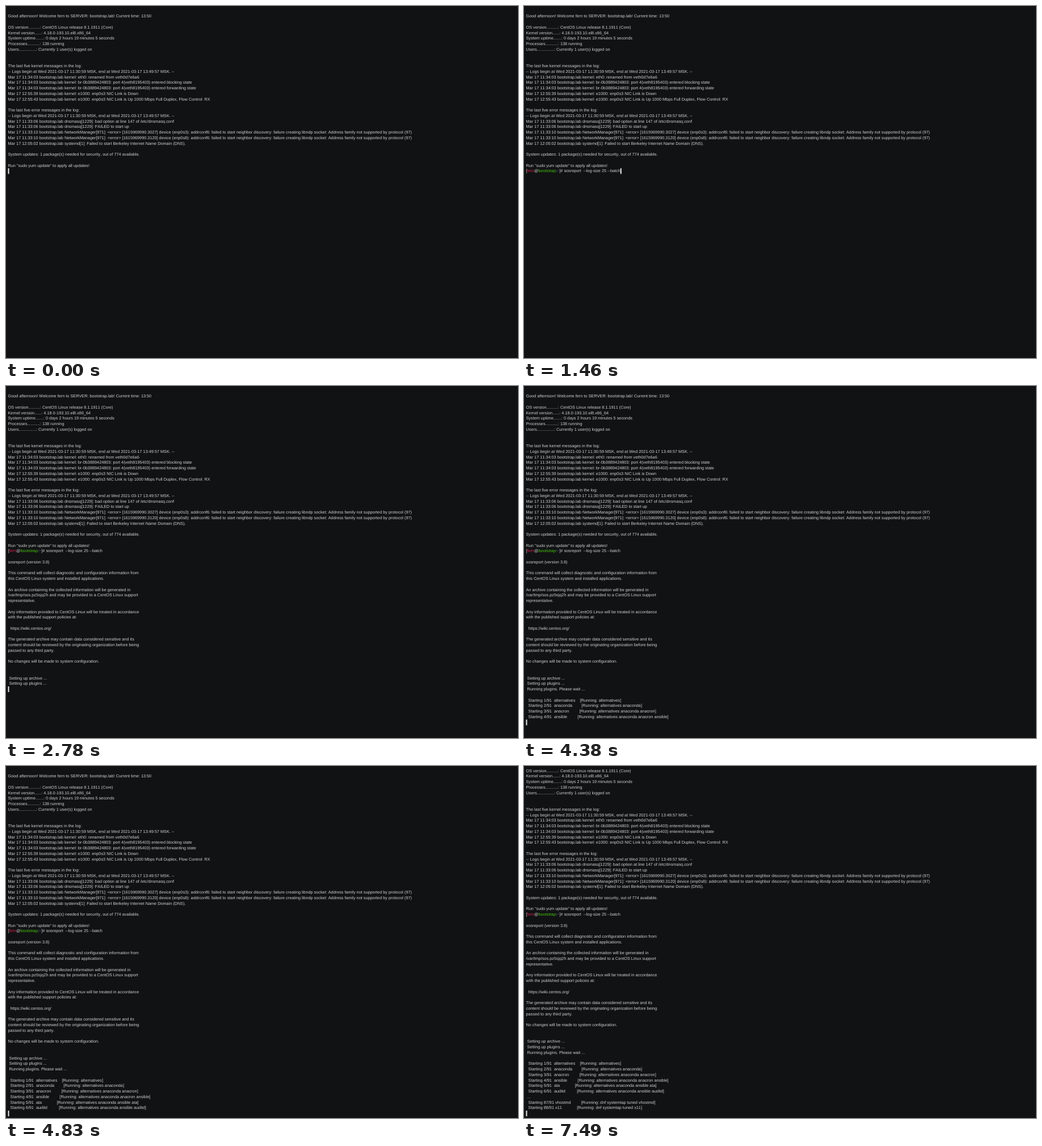
These frames come from a looping animation (902 by 621 pixels, 8 s). An HTML page:

```html
<!DOCTYPE html>
<html lang="en">
<head>
<meta charset="utf-8">
<title>Terminal session</title>
<style>
  html, body { margin: 0; width: 100%; height: 100%; overflow: hidden; background: #111214; }
  #screen {
    position: absolute; left: 0; top: 0; width: 902px; height: 621px; overflow: hidden;
    color: #d0d0d0; font: 7.3px/9.75px "Liberation Sans", Arial, sans-serif;
    text-rendering: geometricPrecision; font-kerning: none;
  }
  .row, #cursor { position: absolute; left: 0; top: 0; transform-origin: 0 0; }
  .row { height: 9.75px; white-space: pre; }
  #cursor { width: 2px; height: 9.5px; background: #e8e8e8; }
  .user { color: #d4204c; }
  .host { color: #45c90c; }
  .path { color: #5a78c8; }
</style>
</head>
<body>
<div id="screen"><div id="cursor"></div></div>
<script>
const LOOP = 8000, PITCH = 9.75, TOP = 3.6, LEFT = 3.5, LAST_ROW = 62, PROMPT_ROW = 29;
const USER = "fern";

const logSpan = "-- Logs begin at Wed 2021-03-17 11:30:59 MSK, end at Wed 2021-03-17 13:49:57 MSK. --";
const log = (time, text) => `Mar 17 ${time} bootstrap.lab ${text}`;
const port = state => log("11:34:03", `kernel: br-0b3889424803: port 4(veth8195403) entered ${state} state`);
const ndp = (id, dev) => log("11:33:10", `NetworkManager[971]: <error> [1615969990.${id}] device (${dev}): addrconf6: ` +
  "failed to start neighbor discovery: failure creating libndp socket: Address family not supported by protocol (97)");
const info = (name, dots, value) => `${name}${".".repeat(dots)}: ${value}`;
const start = (n, name, running) =>
  `  Starting ${(n + "/91").padEnd(5)} ${name.padEnd(15)} [Running: ${running}]`;

const lines = [
  "",
  `Good afternoon! Welcome ${USER} to SERVER: bootstrap.lab! Current time: 13:50`,
  "",
  info("OS version", 10, "CentOS Linux release 8.1.1911 (Core)"),
  info("Kernel version", 6, "4.18.0-193.10.el8.x86_64"),
  info("System uptime", 7, "0 days 2 hours 19 minutes 5 seconds"),
  info("Processes", 11, "138 running"),
  info("Users", 15, "Currently 1 user(s) logged on"),
  "", "",
  "The last five kernel messages in the log:",
  logSpan,
  log("11:34:03", "kernel: eth0: renamed from veth0d7e6a6"),
  port("blocking"),
  port("forwarding"),
  log("12:55:39", "kernel: e1000: enp0s3 NIC Link is Down"),
  log("12:55:43", "kernel: e1000: enp0s3 NIC Link is Up 1000 Mbps Full Duplex, Flow Control: RX"),
  "",
  "The last five error messages in the log:",
  logSpan,
  log("11:33:06", "dnsmasq[1229]: bad option at line 147 of /etc/dnsmasq.conf"),
  log("11:33:06", "dnsmasq[1229]: FAILED to start up"),
  ndp(3027, "enp0s3"),
  ndp(3120, "enp0s8"),
  log("12:05:02", "systemd[1]: Failed to start Berkeley Internet Name Domain (DNS)."),
  "",
  "System updates: 1 package(s) needed for security, out of 774 available.",
  "",
  'Run "sudo yum update" to apply all updates!',
  "",
  "",
  "sosreport (version 3.8)",
  "",
  "This command will collect diagnostic and configuration information from",
  "this CentOS Linux system and installed applications.",
  "",
  "An archive containing the collected information will be generated in",
  "/var/tmp/sos.pz5sjq2h and may be provided to a CentOS Linux support",
  "representative.",
  "",
  "Any information provided to CentOS Linux will be treated in accordance",
  "with the published support policies at:",
  "",
  "  https://wiki.centos.org/",
  "",
  "The generated archive may contain data considered sensitive and its",
  "content should be reviewed by the originating organization before being",
  "passed to any third party.",
  "",
  "No changes will be made to system configuration.",
  "", "",
  " Setting up archive ...",
  " Setting up plugins ...",
  " Running plugins. Please wait ...",
  "",
  start(1, "alternatives", "alternatives"),
  start(2, "anaconda", "alternatives anaconda"),
  start(3, "anacron", "alternatives anaconda anacron"),
  start(4, "ansible", "alternatives anaconda anacron ansible"),
  start(5, "ata", "alternatives anaconda ansible ata"),
  start(6, "auditd", "alternatives anaconda ansible auditd"),
  " ...",
  start(87, "vhostmd", "dnf systemtap tuned vhostmd"),
  start(88, "x11", "dnf systemtap tuned x11"),
];

// time, cursor row, prompt parts shown (1 = prompt, 2 = prompt and command)
const steps = [
  [0, 29, 0], [60, 29, 1], [1460, 29, 2], [2190, 30, 2], [2250, 33, 2], [2780, 54, 2],
  [4380, 60, 2], [4440, 61, 2], [4830, 62, 2], [5630, 63, 2], [7490, 65, 2],
];

const screen = document.getElementById("screen");
const cursor = document.getElementById("cursor");
const rows = lines.map(text => {
  const row = document.createElement("div");
  row.className = "row";
  row.textContent = text;
  screen.append(row);
  return row;
});
rows[PROMPT_ROW].innerHTML =
  `<span>[<span class="user">${USER}</span>@<span class="host">bootstrap</span>:` +
  `<span class="path">~</span>]# </span><span>sosreport  --log-size 25 --batch</span>`;
const parts = [...rows[PROMPT_ROW].children];

// The tiny rotation keeps baselines from snapping to whole pixels.
const place = (el, x, y) => { el.style.transform = `translate(${x}px, ${y}px) rotate(0.002deg)`; };

let shown = null;
function render(step) {
  if (step === shown) return;
  shown = step;
  const [, at, prompt] = step;
  const scroll = Math.max(0, at - LAST_ROW);
  const y = i => TOP + (i - scroll) * PITCH;
  rows.forEach((row, i) => {
    place(row, LEFT, y(i));
    row.style.display = i >= scroll && (i < at || i === PROMPT_ROW) ? "" : "none";
  });
  parts.forEach((part, i) => { part.style.display = i < prompt ? "" : "none"; });
  const x = at === PROMPT_ROW ? rows[at].getBoundingClientRect().width : 0;
  place(cursor, LEFT + x, y(at));
}

const begin = performance.now();
function tick() {
  const t = (performance.now() - begin) % LOOP;
  render(steps.findLast(s => s[0] <= t));
  requestAnimationFrame(tick);
}
tick();
</script>
</body>
</html>
```
